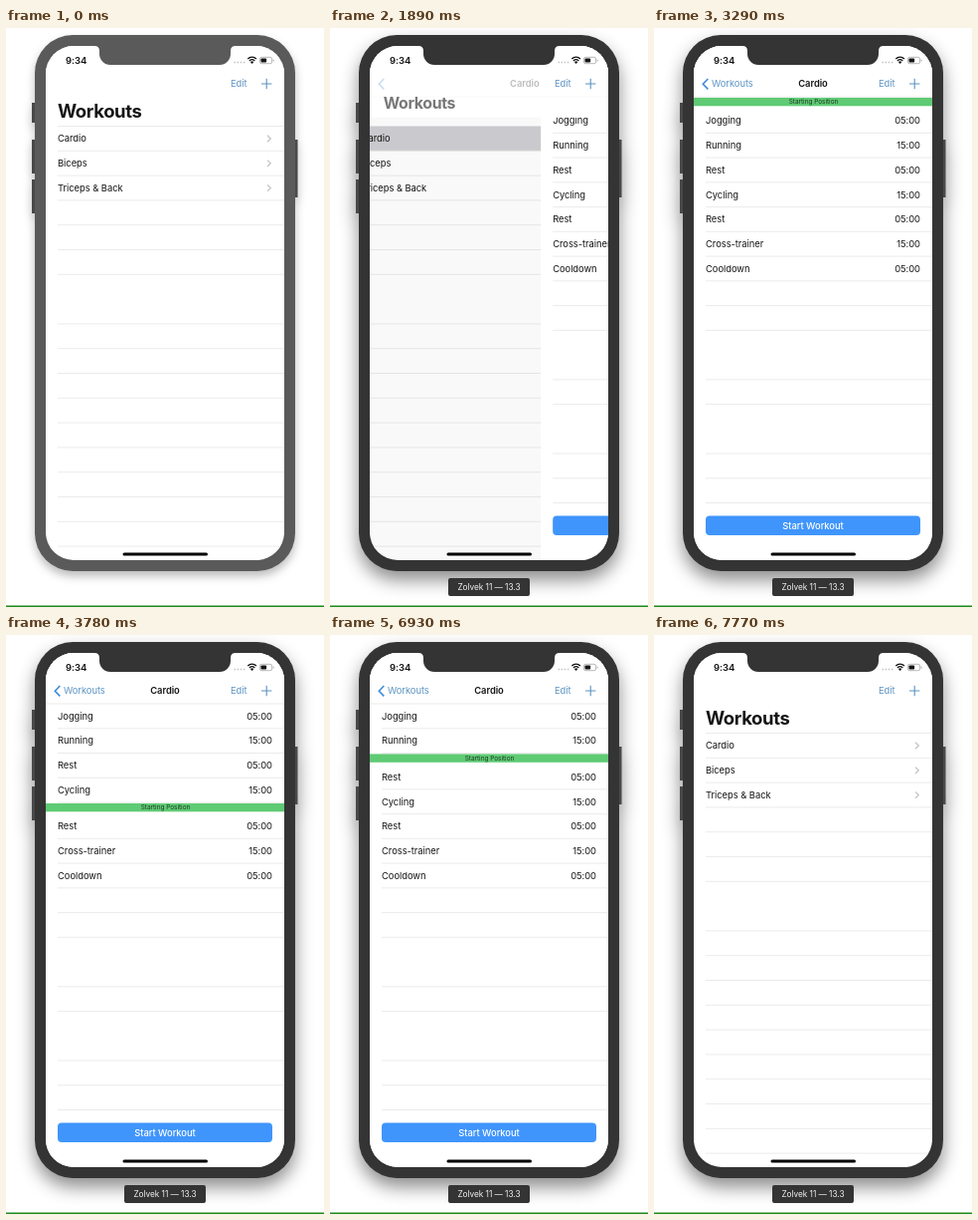
Write an HTML page that moves like this. It is 320 by 581 pixels and loops after 8 s.

```html
<!DOCTYPE html>
<html lang="en">
<head>
<meta charset="utf-8">
<title>Workouts</title>
<style>
  html, body { margin: 0; width: 100%; height: 100%; overflow: hidden; background: #fff; }
  svg { display: block; width: 320px; height: 581px; font: 9.4px Inter, sans-serif; letter-spacing: -.04px; fill: #151515; }
  #phone { color: #5a5a5a; }
  #phone.active { color: #343434; }
  #body { filter: drop-shadow(0 5px 5px rgba(0, 0, 0, .27)); }
  .active #body { filter: drop-shadow(0 9px 9px rgba(0, 0, 0, .45)); }
  .blue { fill: #5b93c2; }
  .bold { font-weight: 600; }
  .line { stroke: #e6e6e8; stroke-width: .8; }
  .stroke { fill: none; }
  .mid { text-anchor: middle; }
  .end { text-anchor: end; }
</style>
</head>
<body>
<svg viewBox="0 0 320 581">
  <defs>
    <clipPath id="screen"><rect x="40" y="18" width="240" height="516" rx="28"/></clipPath>
  </defs>
  <rect y="579.5" width="320" height="1.5" fill="#1b8a1b"/>

  <g id="phone">
    <g id="body">
      <path fill="#484848" d="M26 75h5v20h-5zM26 112h5v34h-5zM26 152h5v34h-5zM289 112h4.5v58h-4.5z"/>
      <rect x="29" y="7" width="262" height="538" rx="38" fill="currentColor"/>
    </g>
    <g clip-path="url(#screen)">
      <rect x="40" y="18" width="240" height="516" fill="#fff"/>
      <g id="list">
        <rect id="highlight" x="40" y="98.5" width="240" height="24.8" fill="#cfcfd3"/>
        <g id="listRows"></g>
      </g>
      <rect id="dim" x="40" y="18" width="240" height="516" fill="#000"/>

      <g id="detail">
        <rect x="40" y="18" width="240" height="516" fill="#fff"/>
        <g id="detailRows"></g>
        <g id="marker">
          <rect x="40" y=".9" width="240" height="8.4" fill="#5fcb74"/>
          <text class="mid" x="160.5" y="7.3" font-size="6.5" fill="#1c3a22">Starting Position</text>
        </g>
        <rect x="52" y="489.5" width="216" height="19.5" rx="4" fill="#3f95fc"/>
        <text class="mid" x="160" y="502.7" font-weight="500" style="fill:#fff">Start Workout</text>
      </g>

      <rect id="bar" x="40" y="18" width="240" fill="#fff"/>
      <path id="hairline" class="line" d="M40 69h240"/>
      <text id="largeTitle" font-size="18.5" font-weight="700" letter-spacing="-.4">Workouts</text>
      <text id="backLabel" class="blue">Workouts</text>
      <path id="chevron" class="stroke" stroke="#3f8cda" stroke-width="1.6" d="M54.3 51l-5 5.2 5 5.2"/>
      <text id="title" class="bold mid" x="160" y="59.4">Cardio</text>
      <text class="blue" x="226" y="59.4">Edit</text>
      <path class="stroke" stroke="#5b93c2" stroke-width="1.1" d="M257 56h10.4M262.2 50.8v10.4"/>

      <text class="bold" x="60" y="35.8" font-size="9.5">9:34</text>
      <path class="stroke" stroke="#c4c4c4" stroke-width="1.6" stroke-dasharray="1.6 1.5" d="M229.5 34.5h11"/>
      <path class="stroke" stroke="#111" stroke-width="1.3" d="M243.3 31a6 6 0 0 1 8.6 0M244.9 32.9a4 4 0 0 1 5.4 0"/>
      <path d="M246 34.2a2.2 2.2 0 0 1 3.2 0l-1.6 1.7z"/>
      <rect class="stroke" stroke="#a5a5a5" stroke-width=".8" x="255.4" y="29.3" width="12.2" height="6.4" rx="1.8"/>
      <rect x="256.5" y="30.4" width="5.6" height="4.2" rx=".8"/>
      <rect x="268.6" y="31.4" width="1" height="2.2" rx=".5" fill="#a5a5a5"/>
      <rect x="117.5" y="526.5" width="85.5" height="3" rx="1.5" fill="#000"/>
    </g>
    <path fill="currentColor" d="M89 17V18Q94 18 94 23V26A11 11 0 0 0 105 37H215A11 11 0 0 0 226 26V23Q226 18 231 18V17Z"/>
  </g>

  <g id="label">
    <rect x="119" y="552" width="82" height="18" rx="2" fill="#343434"/>
    <text class="mid" x="160" y="564.2" font-size="8.3" style="fill:#f2f2f2">Zolvek 11 — 13.3</text>
  </g>
</svg>
<script>
const LOOP = 8000, STEP = 70;
const PITCH = 24.75, TOP = 69, MARKER = 11.6;
const $ = id => document.getElementById(id);
const range = n => [...Array(n).keys()];
const line = y => `<path class="line" d="M52 ${y}h228"/>`;
const move = (el, x, y, scale = 1) => el.setAttribute('transform', `translate(${x} ${y}) scale(${scale})`);
const fade = (el, opacity) => el.setAttribute('opacity', opacity);
const clamp = v => Math.min(1, Math.max(0, v));
const mix = (a, b, p) => a + (b - a) * p;

const ease = (t, start, duration) => {
  const p = clamp((t - start) / duration);
  return p * p * (3 - 2 * p);
};
const spring = (t, start) => {
  const x = Math.max(0, t - start) * .015;
  return 1 - Math.exp(-x) * (1 + x);
};

const workouts = ['Cardio', 'Biceps', 'Triceps & Back'];
const exercises = ['Jogging', 'Running', 'Rest', 'Cycling', 'Rest', 'Cross-trainer', 'Cooldown'];

$('listRows').innerHTML =
  range(18).filter(i => i != 7).map(i => line(98.5 + i * 24.8)).join('') +
  workouts.map((name, i) => {
    const y = 111 + i * 24.8;
    return `<text x="52" y="${y + 3.4}">${name.replace('&', '&amp;')}</text>
      <path class="stroke" stroke="#c3c3c7" stroke-width="1.2" d="M263 ${y - 3.2}l3.3 3.2-3.3 3.2"/>`;
  }).join('');

$('detailRows').innerHTML =
  exercises.map((name, i) => `<g class="row">${line(PITCH)}
    <text x="52" y="15.7">${name}</text>
    <text class="end" x="268" y="15.7">${i % 2 ? '15:00' : '05:00'}</text></g>`).join('') +
  range(16).filter(i => i > 6 && i != 9 && i != 12).map(i => line(105.3 + i * PITCH)).join('');
const rows = [...document.querySelectorAll('.row')];

// The marker sits above exercise 0, then 4, then 2.
function placeRows(t) {
  const first = ease(t, 3360, 400), second = ease(t, 5180, 350);
  const settle = place => mix(mix(place(0), place(4), first), place(2), second);
  move($('marker'), 0, TOP + settle(k => k * PITCH));
  rows.forEach((row, i) => move(row, 0, TOP + i * PITCH + settle(k => i >= k ? MARKER : 0)));
}

function navigate(t) {
  const p = spring(t, 1820) - spring(t, 7070);
  move($('list'), -72 * p, 0);
  fade($('dim'), .08 * p);
  move($('detail'), 240 * (1 - p), 0);
  $('bar').setAttribute('height', mix(80, 51, p));
  fade($('hairline'), p);

  const x = mix(52, 58, p), y = mix(90, 59.4, p);
  move($('largeTitle'), x, y, mix(1, .5, p));
  fade($('largeTitle'), clamp(1 - 1.5 * p));
  move($('backLabel'), x, y, mix(2, 1, p));
  fade($('backLabel'), clamp(1.5 * p - .5));
  fade($('chevron'), p);
  move($('title'), 50 * (1 - p), 0);
  fade($('title'), p);
}

function draw(now) {
  const t = Math.floor(now % LOOP / STEP) * STEP;
  $('phone').classList.toggle('active', t >= 1750);
  fade($('label'), t >= 280 ? 1 : 0);
  fade($('highlight'), t >= 1750 ? 1 - clamp((t - 7070) / 630) : 0);
  navigate(t);
  placeRows(t);
  requestAnimationFrame(draw);
}
draw(performance.now());
</script>
</body>
</html>
```
